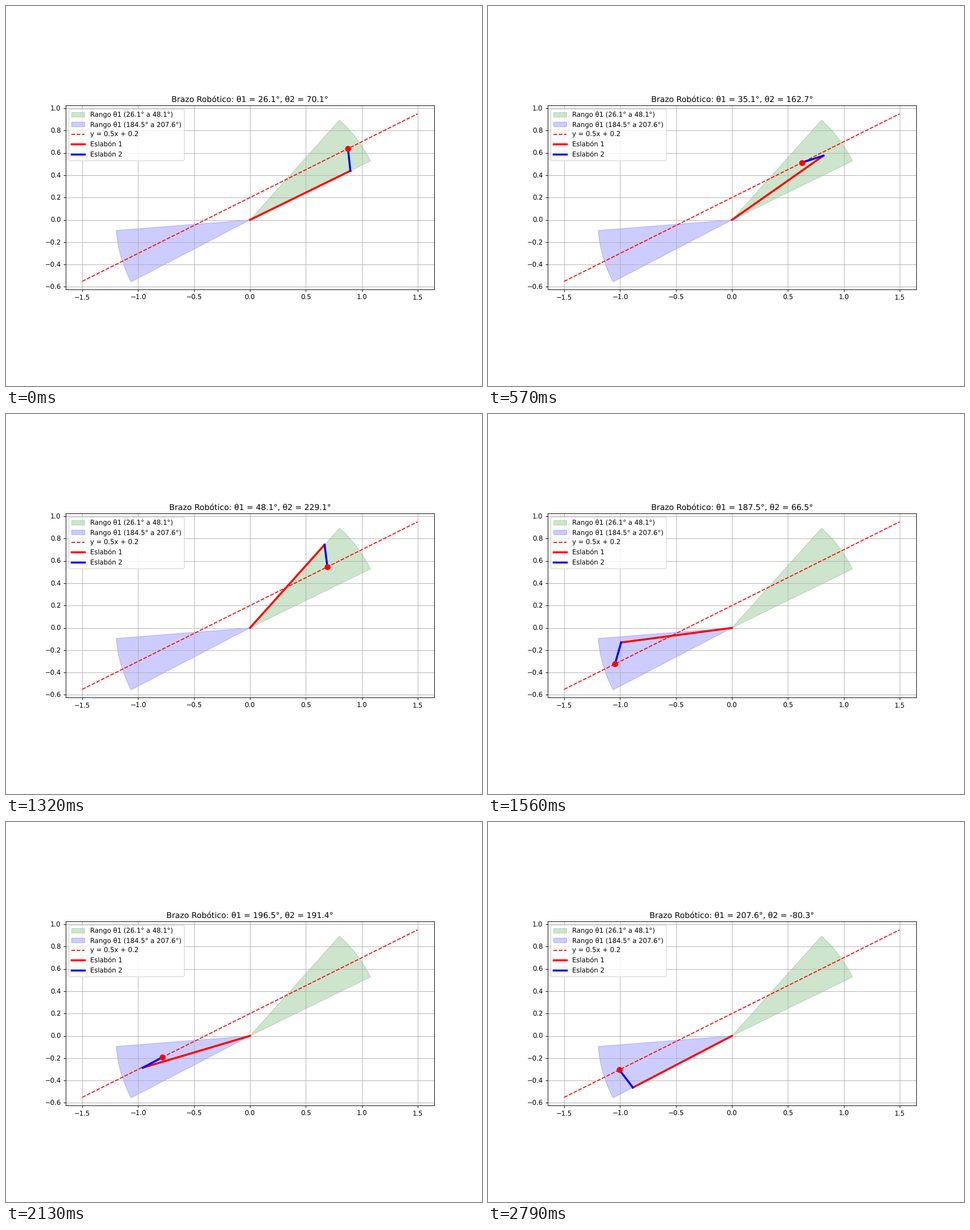
Write a matplotlib script that moves like this. It is 837x669 px and loops after 2.82 s.

```python
import numpy as np
import matplotlib.pyplot as plt
from matplotlib.animation import FuncAnimation

W, H, DPI = 837, 669, 83.7
L1, L2 = 1.0, 0.2
SLOPE, OFFSET = 0.5, 0.2
REACH = L1 + L2

# unhinted glyphs keep text metrics proportional at this odd dpi
plt.rcParams["text.hinting"] = "none"


def elbow_angles(t1):
    """Both second-joint angles that put the tip on the line, or none."""
    tilt = np.arctan(SLOPE)
    gap = OFFSET + L1 * (SLOPE * np.cos(t1) - np.sin(t1))
    k = gap / (L2 * np.hypot(1, SLOPE))
    if abs(k) > 1:
        return []
    mid, half = np.pi / 2 - (t1 - tilt), np.arccos(k)
    if t1 < np.pi / 2:
        pair = [mid - half, mid + half]
    else:
        pair = [mid + half, mid - half + 2 * np.pi]
    # solutions are visited in whole-radian buckets, negatives last
    return sorted(pair, key=lambda t2: int(t2) % 8)


grid = np.linspace(0, 2 * np.pi, 360)
poses = [(t1, t2) for t1 in grid for t2 in elbow_angles(t1)]
firsts = np.array([t1 for t1, _ in poses])
ranges = [firsts[firsts < np.pi / 2], firsts[firsts > np.pi / 2]]

fig, ax = plt.subplots(figsize=((W + 0.01) / DPI, (H + 0.01) / DPI), dpi=DPI)
lift = 0.6 / H
fig.subplots_adjust(bottom=0.11 + lift, top=0.88 + lift)

for angles, color in zip(ranges, ("green", "blue")):
    lo, hi = angles.min(), angles.max()
    arc = np.linspace(lo, hi, 50)
    ax.fill(np.r_[0, REACH * np.cos(arc)], np.r_[0, REACH * np.sin(arc)],
            color=color, alpha=0.2,
            label=f"Rango θ1 ({np.degrees(lo):.1f}° a {np.degrees(hi):.1f}°)")

xs = np.array([-1.5, 1.5])
ax.plot(xs, SLOPE * xs + OFFSET, "r--", label="y = 0.5x + 0.2")
link1, = ax.plot([], [], "r-", lw=3, label="Eslabón 1")
link2, = ax.plot([], [], "b-", lw=3, label="Eslabón 2")
tip, = ax.plot([], [], "ro", ms=8)

ax.set_xlim(-1.65, 1.65)
ax.set_ylim(-0.625, 1.025)
ax.set_aspect("equal")
ax.grid(True)
ax.legend(loc="upper left")
title = ax.set_title("")


def update(i):
    t1, t2 = poses[i]
    x1, y1 = L1 * np.cos(t1), L1 * np.sin(t1)
    x2, y2 = x1 + L2 * np.cos(t1 + t2), y1 + L2 * np.sin(t1 + t2)
    link1.set_data([0, x1], [0, y1])
    link2.set_data([x1, x2], [y1, y2])
    tip.set_data([x2], [y2])
    title.set_text(f"Brazo Robótico: θ1 = {np.degrees(t1):.1f}°, "
                   f"θ2 = {np.degrees(t2):.1f}°")
    return link1, link2, tip, title


anim = FuncAnimation(fig, update, frames=len(poses), interval=30,
                     repeat=True, repeat_delay=0, blit=False)
plt.show()
```
